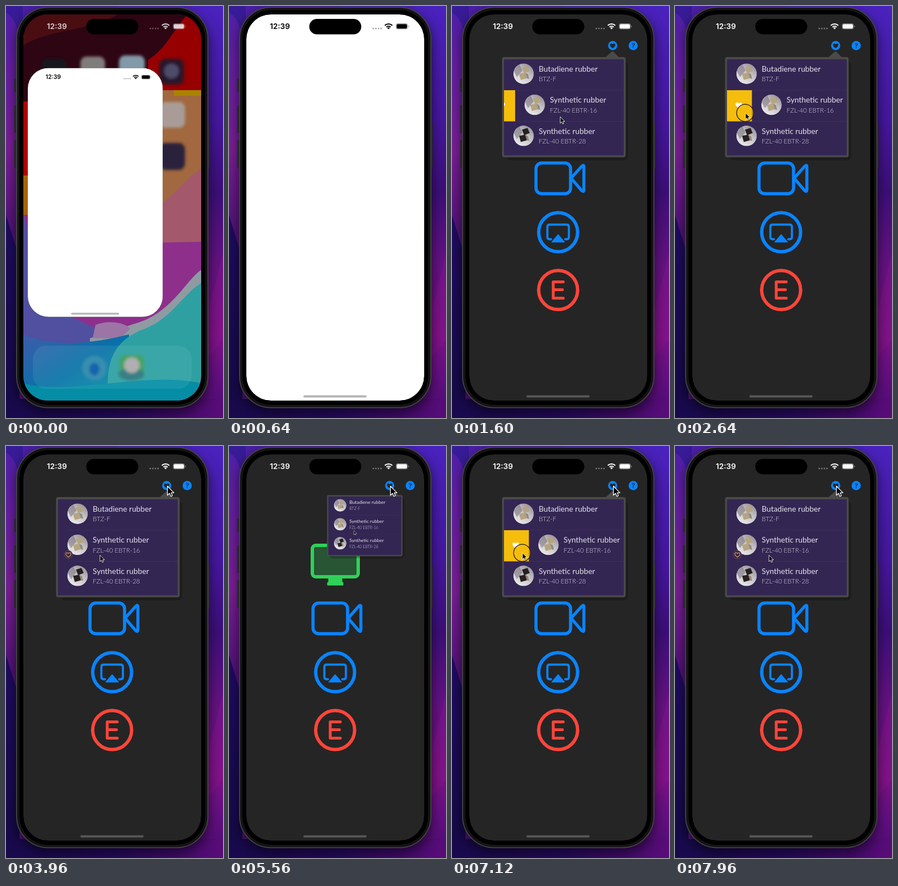
An HTML page that plays this animation: 388x734 px, repeating every 8 s.

```html
<!DOCTYPE html>
<html lang="en">
<head>
<meta charset="utf-8">
<title>Favourite tip popover</title>
<style>
html, body { margin: 0; width: 100%; height: 100%; overflow: hidden; background: #14083e; }
svg { display: block; width: 100vw; height: 100vh; }
.time { font: 600 13.6px Inter, sans-serif; }
.title { font: 400 13.8px Lato, sans-serif; fill: #e6e2ec; }
.sub { font: 300 11.6px Lato, sans-serif; fill: #d6d0e0; }
.line { fill: none; stroke-width: 6; stroke-linejoin: round; stroke-linecap: round; }
</style>
</head>
<body>
<svg viewBox="0 0 388 734" preserveAspectRatio="none">
<defs>
  <linearGradient id="wallL" x2="0" y2="1">
    <stop offset="0" stop-color="#4a1fa6"/><stop offset=".12" stop-color="#6320a6"/>
    <stop offset=".35" stop-color="#7a1f96"/><stop offset=".55" stop-color="#521378"/>
  </linearGradient>
  <linearGradient id="wallR" x2="0" y2="1">
    <stop offset="0" stop-color="#4a22bd"/><stop offset=".28" stop-color="#45179e"/>
    <stop offset=".45" stop-color="#3c0f78"/><stop offset=".62" stop-color="#641283"/>
    <stop offset=".8" stop-color="#7c1287"/><stop offset=".9" stop-color="#640f82"/>
    <stop offset="1" stop-color="#4b0c70"/>
  </linearGradient>
  <linearGradient id="navy" x2="0" y2="1">
    <stop offset="0" stop-color="#200c62"/><stop offset="1" stop-color="#160a48"/>
  </linearGradient>
  <linearGradient id="floor">
    <stop offset="0" stop-color="#180a4c"/><stop offset=".5" stop-color="#260a62"/>
    <stop offset="1" stop-color="#5a0c78"/>
  </linearGradient>
  <linearGradient id="sea" x2="1" y2="1">
    <stop offset="0" stop-color="#3f5cab"/><stop offset=".5" stop-color="#0870a8"/>
    <stop offset="1" stop-color="#0596a8"/>
  </linearGradient>
  <linearGradient id="photo" x1=".9" y1="0" x2=".2" y2="1">
    <stop offset="0" stop-color="#8b858d"/><stop offset=".45" stop-color="#c4c0c6"/>
    <stop offset="1" stop-color="#efedf0"/>
  </linearGradient>
  <filter id="soft" x="-50%" y="-50%" width="200%" height="200%"><feGaussianBlur stdDeviation="2.6"/></filter>
  <filter id="shade" x="-20%" y="-20%" width="140%" height="140%"><feGaussianBlur stdDeviation="11"/></filter>
  <clipPath id="screen"><rect x="31" y="15" width="318" height="688" rx="44"/></clipPath>
  <clipPath id="cardClip"><rect id="card"/></clipPath>
  <clipPath id="cells"><rect x="93" y="95" width="214" height="171"/></clipPath>
  <clipPath id="disc"><circle r="18.3"/></clipPath>
  <path id="heart" d="M0 5C-8 0-6-5-3-5C-1.5-5-.5-4 0-3C.5-4 1.5-5 3-5C6-5 8 0 0 5Z"/>
  <path id="arrow" d="M0 0V12L2.8 9.4L4.6 13.4L6.6 12.5L4.9 8.7H8.6Z" stroke="#fff" stroke-width=".9" stroke-linejoin="round"/>
  <g id="status">
    <text class="time" x="73" y="41">12:39</text>
    <g opacity=".35"><circle cx="258" cy="40" r="1.5"/><circle cx="262.6" cy="40" r="1.5"/><circle cx="267.2" cy="40" r="1.5"/><circle cx="271.8" cy="40" r="1.5"/></g>
    <g fill="none" stroke="currentColor" stroke-width="2">
      <path d="M278.6 34.8A9.6 9.6 0 0 1 292 34.8M281.4 37.6A5.6 5.6 0 0 1 289.2 37.6"/>
    </g>
    <path d="M285.3 41.5L282.9 39.1A3.4 3.4 0 0 1 287.7 39.1Z"/>
    <rect x="298.5" y="31" width="21" height="10.4" rx="3.4" opacity=".4"/>
    <rect x="300" y="32.4" width="18" height="7.6" rx="2.2"/>
    <path d="M320.5 34.5a2 2 0 0 1 0 3.6Z" opacity=".5"/>
  </g>
</defs>

<!-- desktop wallpaper -->
<rect width="388" height="734" fill="url(#wallR)"/>
<path d="M0 0H200V734H0Z" fill="url(#wallL)"/>
<path d="M0 12C14 18 24 40 30 90V0H0Z" fill="#2f1a92" opacity=".7"/>
<path d="M0 372L24 450V734H0Z" fill="url(#navy)"/>
<path d="M0 734V700H388V734Z" fill="url(#floor)"/>
<path d="M388 440L358 560V628L388 596Z" fill="#8d168f" opacity=".35"/>
<rect x="17" y="10" width="346" height="716" rx="58" fill="#000" opacity=".55" filter="url(#shade)"/>

<!-- phone body -->
<g fill="#29272b">
  <rect x="14.5" y="129" width="6" height="24" rx="1.5"/>
  <rect x="14.5" y="177" width="6" height="49" rx="1.5"/>
  <rect x="14.5" y="239" width="6" height="50" rx="1.5"/>
  <rect x="359" y="210" width="5" height="80" rx="1.5"/>
</g>
<rect x="19" y="2.5" width="342" height="713" rx="56" fill="#111" stroke="#424143" stroke-width="2"/>
<rect x="23" y="6.5" width="334" height="705" rx="52" fill="#000" stroke="#222224"/>

<g clip-path="url(#screen)">
  <g id="home">
    <rect x="31" y="15" width="318" height="688" fill="#8e2f8c"/>
    <path d="M31 15H349V170H31Z" fill="#2d0513"/>
    <path d="M31 15H200C150 45 80 40 31 70Z" fill="#4a0d12"/>
    <path d="M349 15H325C300 40 288 75 254 96V160H349Z" fill="#970000"/>
    <path d="M31 170H60V302H31Z" fill="#b10000"/>
    <path d="M31 302H60V372H31Z" fill="#a66209"/>
    <path d="M254 150H349V300L254 390Z" fill="#a2683f"/>
    <path d="M300 150H349V160H300Z" fill="#a98400"/>
    <path d="M349 290C315 310 300 345 254 365V422L349 420Z" fill="#a3596b"/>
    <path d="M31 372C45 400 50 530 130 560L220 600H31Z" fill="#504fa0"/>
    <path d="M349 470C322 488 296 548 230 566L150 592V620H349Z" fill="#8f9ba3"/>
    <path d="M160 568C185 558 215 565 222 575L205 592H155Z" fill="#9c75a6"/>
    <path d="M31 585C90 610 160 600 220 585V703H31Z" fill="url(#sea)"/>
    <path d="M349 494C318 510 296 560 240 578C190 600 175 640 185 703H349Z" fill="#2fa0a2"/>
    <path d="M31 672C110 695 250 650 349 672V703H31Z" fill="#058da6"/>
    <rect x="48" y="605" width="284" height="77" rx="24" fill="#8ad0d0" opacity=".13"/>
    <g filter="url(#soft)">
      <rect x="64" y="94" width="44" height="46" rx="11" fill="#17171a"/>
      <rect x="133" y="90" width="44" height="46" rx="11" fill="#817c7c"/>
      <rect x="202" y="88" width="46" height="46" rx="11" fill="#8299a9"/>
      <rect x="274" y="94" width="44" height="46" rx="11" fill="#29172a"/>
      <circle cx="296" cy="116" r="13" fill="#4d4b6a"/>
      <rect x="274" y="171" width="46" height="46" rx="11" fill="#a99c98"/>
      <rect x="274" y="244" width="46" height="48" rx="11" fill="#2b223b"/>
      <circle cx="158" cy="645" r="22" fill="#398eaf"/>
      <ellipse cx="158" cy="647" rx="9" ry="11" fill="#1262ad"/>
      <rect x="203" y="622" width="44" height="43" rx="11" fill="#45a360"/>
      <ellipse cx="224" cy="656" rx="23" ry="11" fill="#387f86"/>
      <circle cx="225" cy="640" r="14" fill="#b0aeb0"/>
    </g>
    <use href="#status" fill="#dcd3d6" color="#dcd3d6"/>
  </g>

  <g clip-path="url(#cardClip)">
    <g id="app">
      <rect x="31" y="15" width="318" height="688" fill="#252525"/>
      <g fill="#0a84ff"><circle cx="287.3" cy="70.5" r="8.2"/><circle cx="324" cy="70.5" r="8.2"/></g>
      <use href="#heart" transform="translate(287.3 71) scale(.85)" fill="#252525"/>
      <text x="324" y="74.6" text-anchor="middle" font-family="Inter, sans-serif" font-weight="600" font-size="11.5" fill="#252525">?</text>

      <rect id="glow" x="149" y="177" width="82" height="56" rx="5" fill="#30d158" opacity=".28"/>
      <rect class="line" x="149" y="177" width="82" height="56" rx="6" stroke="#30d158"/>
      <path d="M178 235H202V243H204V248H176V243H178Z" fill="#30d158" stroke="#30d158" stroke-linejoin="round"/>
      <g class="line" stroke="#0a84ff">
        <rect x="150.2" y="279.8" width="61.8" height="54.6" rx="10" stroke-width="5.6"/>
        <path d="M213 306.8L231.5 286Q235.8 281.500 235.8 287V327Q235.8 332.500 231.500 328.500Z" stroke-width="5.400"/>
        <circle cx="189.800" cy="403" r="34.800"/>
        <path d="M177 415.500H174.500Q170.500 415.500 170.500 411.500V393.500Q170.500 389.500 174.500 389.500H205Q209 389.500 209 393.500V411.500Q209 415.500 205 415.500H202.500" stroke-width="3.800"/>
      </g>
      <path d="M189.800 407.500L201 420.500H178.600Z" fill="#0a84ff" stroke="#0a84ff" stroke-linejoin="round" stroke-width="1.500"/>
      <g class="line" stroke="#ff453a">
        <circle cx="189.800" cy="506" r="34.800"/>
        <path d="M199 491.500H181V520.500H199M181 505.500H197.500" stroke-width="5"/>
      </g>

      <g id="pop">
        <rect x="98" y="98" width="217" height="177" rx="7" fill="#000" opacity=".22"/>
        <path d="M274 92L285 82Q287 80 289 82L299 92Z" fill="#4a4a4a"/>
        <rect x="89.500" y="91" width="221" height="178.500" rx="4" fill="#4a4a4a"/>
        <g clip-path="url(#cells)">
          <rect x="93" y="95" width="214" height="171" fill="#332653"/>
          <g id="rows"></g>
          <path d="M110 150H307M110 205.500H307" stroke="#3c2f5c"/>
          <rect id="swipe" x="93" y="150" height="55.500" fill="#f5bd0c"/>
          <use id="like" href="#heart" fill="#fff"/>
          <g id="badge">
            <circle cx="111.500" cy="193.500" r="7.300" fill="#39293c" stroke="#67526a" stroke-width=".8"/>
            <use href="#heart" transform="translate(111.500 194) scale(.8)" fill="none" stroke="#dda58b" stroke-width="1.400"/>
          </g>
          <circle id="touch" cx="125.500" cy="190.500" r="15.300" fill="#f5bd0c" fill-opacity=".55" stroke="#201a20" stroke-width="1.300"/>
          <use id="hand" href="#arrow"/>
        </g>
      </g>
      <rect id="cover" x="31" y="15" width="318" height="688" fill="#fff"/>
      <use id="bar" href="#status"/>
      <rect id="grip" x="133" width="113" height="4" rx="2"/>
    </g>
  </g>
</g>
<rect x="143.500" y="23" width="93" height="27.500" rx="13.700" fill="#000"/>
<use id="mouse" href="#arrow"/>
</svg>

<script>
const $ = id => document.getElementById(id);
const set = (id, attrs) => { for (const k in attrs) $(id).setAttribute(k, attrs[k]); };
const show = (id, on) => set(id, { visibility: on ? 'inherit' : 'hidden' });
const clamp = x => Math.min(1, Math.max(0, x));
const span = (t, a, b) => clamp((t - a) / (b - a));
const smooth = (t, a, b) => { const x = span(t, a, b); return x * x * (3 - 2 * x); };
const easeOut = x => 1 - (1 - x) ** 3;
const mix = (a, b, k) => a + (b - a) * k;

const LOOP = 8000;
const OPEN = [920, 5453];
const CLOSE = 4600;
const ROWS = [
  ['Butadiene rubber', 'BTZ-F', '#b3a482'],
  ['Synthetic rubber', 'FZL-40 EBTR-16', '#b5a57f'],
  ['Synthetic rubber', 'FZL-40 EBTR-28', '#26211f']
];

$('rows').innerHTML = ROWS.map(([title, sub, tone], i) => {
  const y = 120.7 + i * 55.3;
  return `<g id="row${i}">
    <g transform="translate(128 ${y})" clip-path="url(#disc)">
      <circle r="18.500" fill="url(#photo)"/>
      <path d="M-18-6L-8-17L-2-6L-12 6Z" fill="#6f6972" opacity=".5"/>
      <path d="M-3-11L7-14L11-5L1-1Z" fill="${tone}"/>
      <path d="M-8 0L3-2L6 8L-5 11Z" fill="${tone}"/>
      <path d="M3-2L8 1L10 9L6 8Z" fill="#7c705a" opacity=".7"/>
    </g>
    <text class="title" x="155" y="${y - 3.7}">${title}</text>
    <text class="sub" x="155" y="${y + 13.6}">${sub}</text>
  </g>`;
}).join('');

function drawLaunch(t) {
  const k = easeOut(span(t, 0, 560));
  const x = mix(39, 31, k), y = mix(111, 15, k);
  const w = mix(241, 318, k), h = mix(442, 688, k), s = w / 318;
  const white = 1 - span(t, 800, 1120);
  const ink = white > .5 ? '#000' : '#fff';
  set('card', { x, y, width: w, height: h, rx: mix(37, 44, k) });
  set('app', { transform: `translate(${x} ${y}) scale(${s}) translate(-31 -15)` });
  set('cover', { opacity: white });
  set('bar', { fill: ink, color: ink });
  set('grip', { y: 15 + h / s - 9.5, fill: white > .5 ? '#b5b5b5' : white > 0 ? '#3b393b' : '#575757' });
  show('home', k < 1);
}

// Demo inside the popover: swipe the row, tap the heart, return.
function drawDemo(v) {
  const drag = smooth(v, 430, 970);
  const tap = smooth(v, 1080, 1480);
  const back = smooth(v, 1900, 2300);
  const shift = 44.5 * (drag - smooth(v, 1800, 2080));
  const hx = mix(mix(mix(168, 225, drag), 126, tap), 168, back);
  const hy = mix(mix(mix(194.5, 201, drag), 190.5, tap), 194.5, back);
  set('row1', { transform: `translate(${shift} 0)` });
  set('swipe', { width: shift });
  set('like', { transform: `translate(${69.5 + shift} 177)` });
  set('hand', { transform: `translate(${hx} ${hy}) scale(.95)` });
  show('like', shift > 0);
  show('touch', v > 1500 && v < 1850);
  set('badge', { opacity: span(v, 1850, 2080) });
}

function drawPopover(t) {
  const start = t < OPEN[1] ? OPEN[0] : OPEN[1];
  const v = t - start;
  const s = easeOut(span(v, 0, 400));
  const fade = t < OPEN[1] ? 1 - span(t, CLOSE, CLOSE + 240) : 1;
  show('pop', s > 0 && fade > 0);
  set('pop', {
    transform: `translate(310 82) scale(${s}) translate(-310 -82)`,
    opacity: fade * span(v, 0, 90)
  });
  drawDemo(v);
}

function drawMouse(t) {
  const k = smooth(t, 3000, 3700);
  show('mouse', t >= 3000);
  set('mouse', { transform: `translate(${mix(392, 288.6, k)} ${mix(330, 71.5, k)}) scale(1.36)` });
}

function draw(t) {
  drawLaunch(t);
  drawPopover(t);
  drawMouse(t);
  show('glow', t > 3000);
}

const begin = performance.now();
function tick() {
  draw((performance.now() - begin) % LOOP);
  requestAnimationFrame(tick);
}
tick();
</script>
</body>
</html>
```
